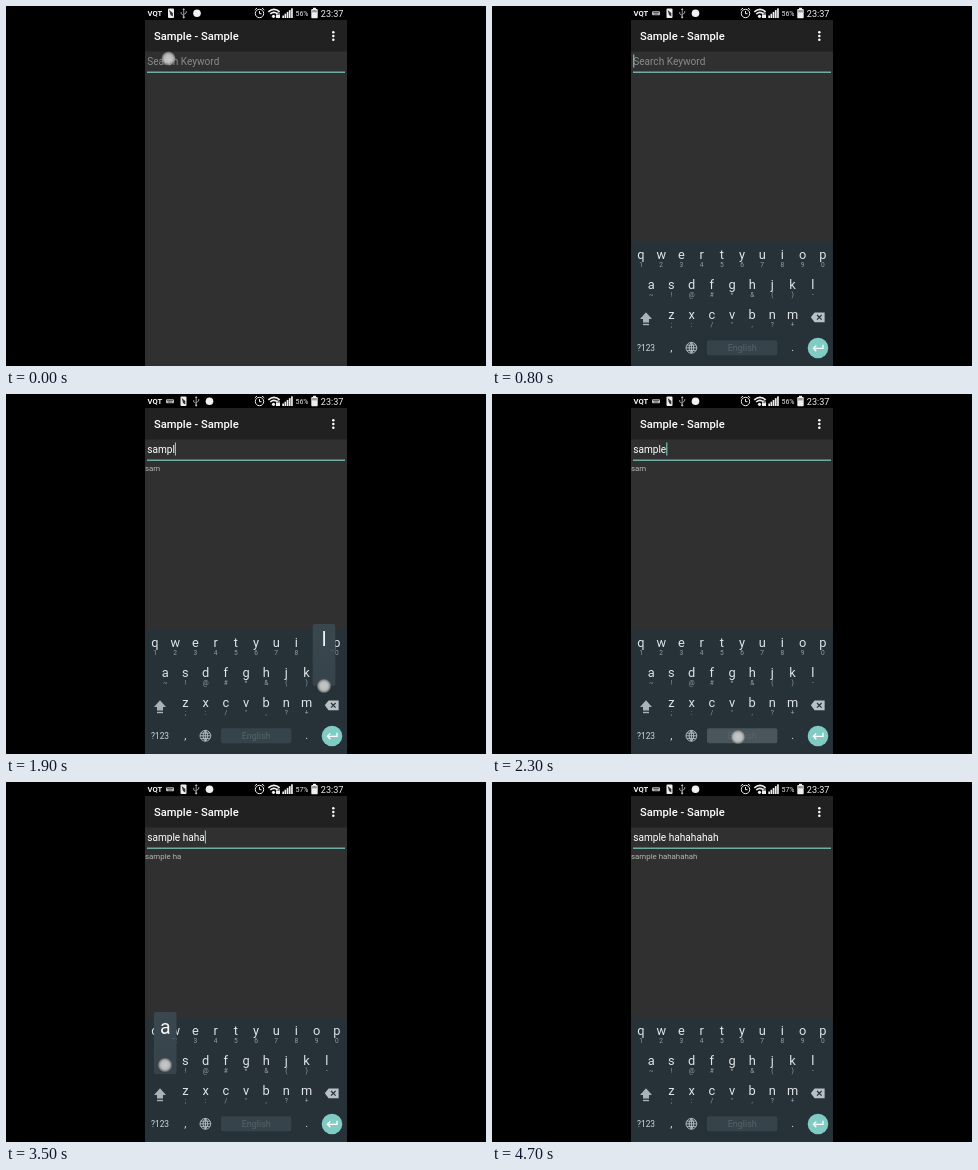
An HTML page with a canvas that plays this animation: 480x360 px, repeating every 4.9 s.

```html
<!DOCTYPE html>
<html lang="en">
<head>
<meta charset="utf-8">
<title>Search sample</title>
<style>
html, body { margin: 0; width: 100%; height: 100%; overflow: hidden; background: #000; }
canvas { display: block; }
</style>
</head>
<body>
<canvas id="stage" width="480" height="360"></canvas>
<script>
const ctx = document.getElementById('stage').getContext('2d');
const LOOP = 4900, STEP = 100;
const TEAL = '#80cbc4', KEY = '#dfe4e6', DIM = '#929da2';
const PITCH = 20.2;

// key, finger down, finger up (character committed), touch x, touch y
const presses = [
  ['s', 1000, 1100, 178, 285], ['a', 1200, 1300, 155, 287],
  ['m', 1400, 1500, 298, 315], ['p', 1600, 1700, 329, 257],
  ['l', 1800, 1900, 318, 292], ['e', 2000, 2100, 188, 256],
  [' ', 2300, 2400, 246, 343],
  ['h', 2900, 3000, 257, 284], ['a', 3100, 3200, 159, 284],
  ['h', 3200, 3300, 262, 280], ['a', 3400, 3500, 159, 283],
  ['h', 3600, 3700, 264, 278], ['a', 3800, 3900, 160.5, 282],
  ['h', 3800, 4000, 265, 277.3], ['a', 4000, 4100, 160, 282],
  ['h', 4100, 4200, 264, 278]
];
const samples = [1600, 2400, 3200, 4500];

const rows = [
  { keys: 'qwertyuiop', hints: '1234567890', x: 149, y: 253 },
  { keys: 'asdfghjkl', hints: '~!@#*&()-', x: 159.2, y: 283 },
  { keys: 'zxcvbnm', hints: ';:/",?+', x: 179.4, y: 313 }
];

function text(str, x, y, size, color, align = 'left', weight = 400) {
  ctx.font = `${weight} ${size}px Roboto, sans-serif`;
  ctx.textAlign = align;
  ctx.fillStyle = color;
  ctx.fillText(str, x, y);
}

function rect(x, y, w, h, color) {
  ctx.fillStyle = color;
  ctx.fillRect(x, y, w, h);
}

function round(x, y, w, h, r, color) {
  ctx.fillStyle = color;
  ctx.beginPath();
  ctx.roundRect(x, y, w, h, r);
  ctx.fill();
}

function disc(x, y, r, color) {
  ctx.fillStyle = color;
  ctx.beginPath();
  ctx.arc(x, y, r, 0, 7);
  ctx.fill();
}

function poly(points, color) {
  ctx.fillStyle = color;
  ctx.beginPath();
  points.forEach(([x, y]) => ctx.lineTo(x, y));
  ctx.closePath();
  ctx.fill();
}

function stroke(d, color, width = 1) {
  ctx.strokeStyle = color;
  ctx.lineWidth = width;
  ctx.stroke(new Path2D(d));
}

const typedAt = t => presses.filter(p => p[2] <= t).map(p => p[0]).join('');

function notices(t) {
  let x = 165;
  if (t >= 300) {
    round(160, 5.2, 8, 4, 1, '#bbb');
    rect(161, 6.1, 6, 0.7, '#333');
    rect(162, 7.7, 4, 0.7, '#333');
    x = 177.5;
  }
  round(x - 3, 2.5, 6, 9.5, 1, '#eee');
  poly([[x - 1.8, 4], [x + 1.8, 7], [x + 1.8, 10.5], [x - 0.5, 9]], '#333');
  x += 12.7;
  stroke(`M${x} 3V11.5M${x} 9.5L${x - 2.5} 7.8V6M${x} 8.5L${x + 2.5} 7V5`, '#bbb', 0.8);
  poly([[x - 1.3, 4], [x, 2], [x + 1.3, 4]], '#bbb');
  disc(x, 11.3, 1.1, '#bbb');
  disc(x + 13.3, 7.3, 3.8, '#f2f2f2');
}

function statusBar(t) {
  text('VQT', 141.5, 10.2, 7.6, '#f2f2f2', 'left', 700);
  notices(t);

  // alarm
  stroke('M257.7 7.5A4.2 4.2 0 1 1 249.3 7.5A4.2 4.2 0 1 1 257.7 7.5M253.5 5V7.7H255.5M248.7 4L251 2M258.3 4L256 2', '#eee', 1);
  // wifi with lock
  stroke('M262.3 5.8Q268 0.8 273.7 5.8M264.2 8Q268 4.8 271.5 8', '#eee', 1.6);
  disc(267.5, 10.3, 1.6, '#eee');
  rect(270, 8.5, 4, 3.5, '#eee');
  stroke('M270.8 8.5V7.3Q272 6 273.2 7.3V8.5', '#eee', 0.8);
  // signal
  for (let i = 0; i < 5; i++) rect(276.3 + i * 2.2, 9.5 - i * 1.8, 1.7, 2.5 + i * 1.8, '#eee');

  text(t < 2500 ? '56%' : '57%', 289.5, 10, 7, '#e6e6e6');
  rect(307, 1.8, 3, 1.4, '#eee');
  round(305.3, 3, 6.4, 9.2, 0.8, '#eee');
  rect(306.2, 4, 4.6, 2.4, '#999');
  text('23:37', 314.8, 10.8, 9.1, '#f2f2f2');
}

function app(t) {
  rect(139, 0, 202, 360, '#303030');
  rect(139, 0, 202, 14, '#000');
  rect(139, 14, 202, 31.5, '#212121');
  statusBar(t);
  text('Sample - Sample', 148, 34, 11.2, '#fff', 'left', 500);
  for (const y of [26.3, 30, 33.7]) disc(327.3, y, 1.25, '#fff');

  const typed = typedAt(t);
  if (typed) text(typed, 141.2, 59, 10.1, '#fff');
  else text('Search Keyword', 141.2, 59, 10.1, '#8a8a8a');
  rect(141, 65.6, 198, 1.2, TEAL);

  // caret restarts its blink on each edit
  const edits = presses.map(p => p[2]).filter(u => u <= t);
  const last = edits.length ? edits[edits.length - 1] : 400;
  if (t >= last && (t - last) % 1000 < 500) {
    const w = typed ? ctx.measureText(typed).width : 0;
    rect(141.2 + w, 48.5, 1.1, 13, TEAL);
  }

  const tick = samples.filter(s => s <= t).pop();
  if (tick) text(typedAt(tick), 139, 77.3, 7.86, '#b5b5b5');
}

function keyboard(t) {
  const p = Math.max(0, Math.min(1, (t - 200) / 300));
  if (!p) return;
  ctx.save();
  ctx.globalAlpha = p;
  ctx.translate(0, (1 - p) * (1 - p) * 30);
  rect(139, 236, 202, 124, '#263238');

  for (const { keys, hints, x, y } of rows) {
    [...keys].forEach((k, i) => {
      text(k, x + i * PITCH, y, 12.8, KEY, 'center');
      text(hints[i], x + i * PITCH, y + 7.8, 6.6, DIM, 'center');
    });
  }

  // shift
  poly([[154, 306.3], [160, 313], [157, 313], [157, 316.6], [151, 316.6], [151, 313], [148, 313]], '#a9b2b6');
  rect(151, 317.8, 6, 1.4, '#a9b2b6');
  // backspace
  poly([[318.8, 311.3], [322.6, 306.5], [332.6, 306.5], [332.6, 316.2], [322.6, 316.2]], '#b9c1c4');
  stroke('M325 309L329.6 313.7M329.6 309L325 313.7', '#263238', 1.2);

  text('?123', 154, 345, 8.4, '#d0d6d8', 'center');
  text(',', 179.4, 345, 11, KEY, 'center');
  text('.', 300.6, 345, 11, KEY, 'center');
  // globe
  stroke('M194 341.8A5.4 5.4 0 1 1 204.8 341.8A5.4 5.4 0 1 1 194 341.8M194 341.8H204.8M199.4 336.4V347.2M195 339.2H203.8M195 344.4H203.8M199.4 336.4Q194.6 341.8 199.4 347.2Q204.2 341.8 199.4 336.4', '#b9c1c4', 0.9);

  const held = presses.some(q => q[0] === ' ' && t >= q[1] && t <= q[2]);
  round(215, 334.3, 70.3, 15, 2, held ? '#4a565c' : '#37434a');
  text('English', 250.2, 345.2, 9, '#56636a', 'center');

  disc(326, 342, 10.3, TEAL);
  stroke('M331 338.8V342.3H321.5M324.3 339.4L321.4 342.3L324.3 345.2', '#fff', 1.3);
  ctx.restore();
}

function popup(key, fresh) {
  const row = rows.find(r => r.keys.includes(key));
  if (!row) return;
  const cx = Math.min(318, Math.max(151, row.x + row.keys.indexOf(key) * PITCH));
  const top = row.y - 53 + (fresh ? 3 : 0);
  const bottom = row.y + 9;
  const fill = ctx.createLinearGradient(0, top, 0, bottom);
  fill.addColorStop(0, '#3a474e');
  fill.addColorStop(1, '#36434a');
  round(cx - 11.3, top, 22.6, bottom - top, 2, fill);
  text(key, cx, top + 22.3, 19.5, '#f4f6f6', 'center');
  text('…', cx + 8, top + 27, 5.5, '#87939a', 'center');
}

function touch(x, y) {
  const g = ctx.createRadialGradient(x, y, 0, x, y, 7.5);
  g.addColorStop(0, 'rgba(215,215,215,.9)');
  g.addColorStop(0.55, 'rgba(205,205,205,.88)');
  g.addColorStop(0.8, 'rgba(170,170,170,.7)');
  g.addColorStop(1, 'rgba(130,130,130,0)');
  disc(x, y, 7.5, g);
}

function draw(t) {
  rect(0, 0, 480, 360, '#000');
  ctx.save();
  ctx.beginPath();
  ctx.rect(139, 0, 202, 360);
  ctx.clip();
  app(t);
  keyboard(t);
  const active = presses.filter(p => t >= p[1] && t <= p[2]);
  active.forEach(p => popup(p[0], t === p[1] && p[2] - p[1] === STEP));
  active.forEach(p => touch(p[3], p[4]));
  if (t <= 100) touch(162.5, 52.5);
  ctx.restore();
}

const start = performance.now();
function frame() {
  const t = (performance.now() - start) % LOOP;
  draw(Math.min(4700, Math.floor(t / STEP) * STEP));
  requestAnimationFrame(frame);
}
frame();
</script>
</body>
</html>
```
